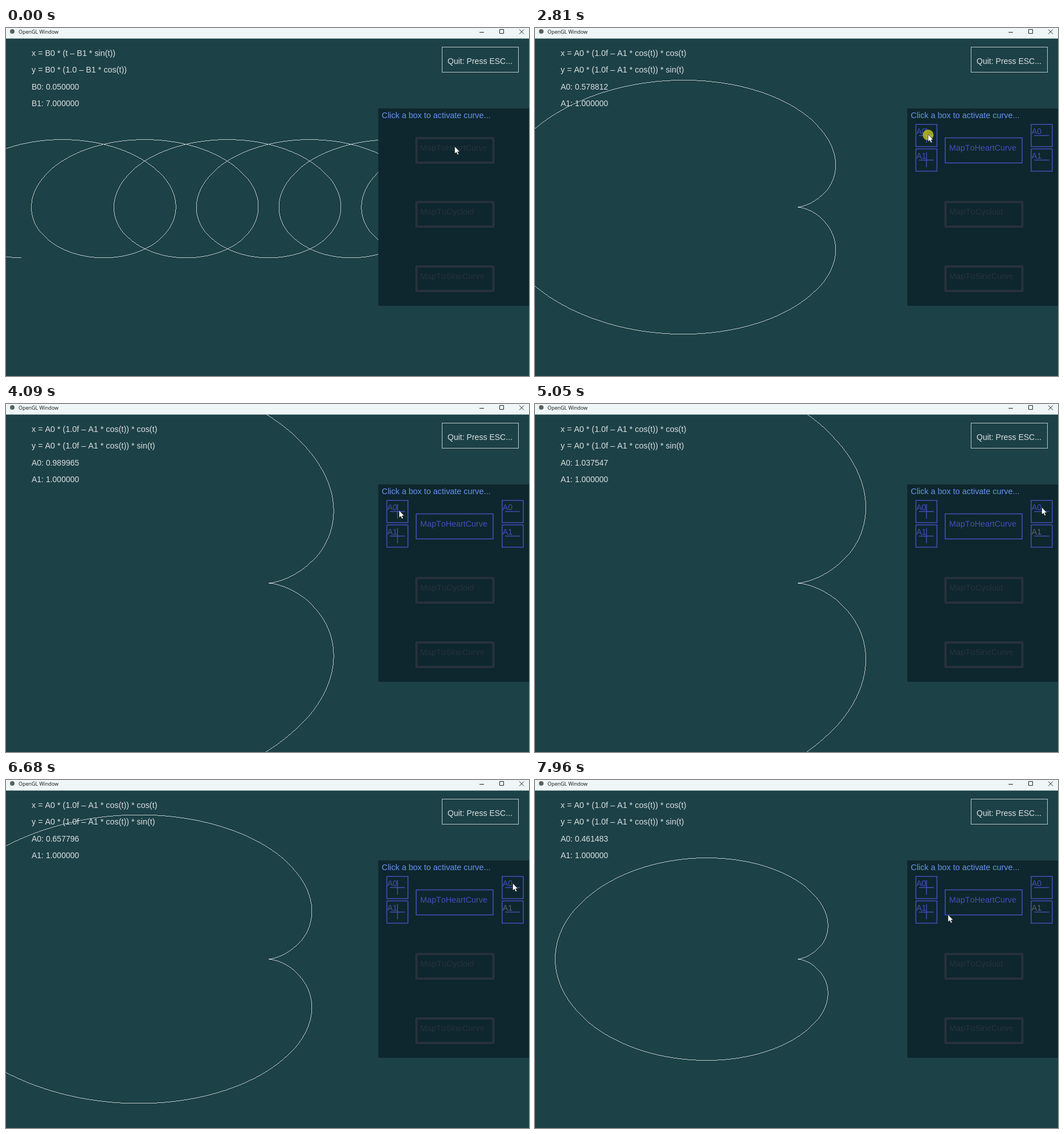
Write an HTML page that moves like this. It is 918 px wide and 610 px high and loops after 8 s.

```html
<!DOCTYPE html>
<html lang="en">
<head>
<meta charset="utf-8">
<title>OpenGL Window</title>
<style>
html, body { margin: 0; width: 100%; height: 100%; overflow: hidden; background: #1c4147; }
svg { display: block; }
text { font-family: "Liberation Sans", Arial, sans-serif; font-kerning: none; white-space: pre; }
.bar { font-family: "Open Sans", "Noto Sans", sans-serif; }
.crisp { shape-rendering: crispEdges; }
</style>
</head>
<body>
<svg id="stage" width="918" height="610" viewBox="0 0 918 610"></svg>
<script>
const LOOP = 8000, HEART_ON = 520;
const LIGHT = '#dcdfdf', LINE = '#bcc6c7', BLUE = '#4150bb', DIM = '#27323c';

// Evenly spaced events: [first time, last time, number of events, ...]
const RAISES = [[2400, 2540, 2], [2810, 3080, 4], [3340, 3820, 7], [4020, 4290, 3]];
const LOWERS = [[4930, 5650, 9], [5730, 5790, 2], [5920, 6410, 7],
                [6610, 6680, 2], [6750, 7360, 12], [7420, 7490, 2]];
// The pointer moves in steps to the x, y that end each entry
const MOVES = [[1120, 1120, 1, 782, 209.5], [1250, 1810, 9, 696, 186.5], [2340, 2340, 1, 690, 186.5],
               [4360, 4650, 5, 908, 184], [4720, 4790, 2, 895, 183], [4860, 4860, 1, 889.5, 181],
               [7690, 7960, 5, 725, 236]];

const label = (x, y, s, size = 14.35, fill = LIGHT, extra = '') =>
  `<text x="${x}" y="${y}" font-size="${size}" fill="${fill}" ${extra}>${s}</text>`;
const box = (x, y, w, h, color, width) =>
  `<rect x="${x}" y="${y}" width="${w}" height="${h}" fill="none" stroke="${color}" stroke-width="${width}" stroke-linejoin="round"/>`;
const line = d => `<path d="${d}" fill="none" stroke="${BLUE}" stroke-width="1.4"/>`;

const stepButton = (x, y, name, plus) =>
  box(x, y, 37, 39, BLUE, 1.6) +
  line(`M${x + 5.5} ${y + 19.5}h26` + (plus ? `M${x + 18.7} ${y + 6}v26` : '')) +
  label(x + 1, y + 16.5, name, 14, BLUE, plus ? '' : `id="minus${name}"`);

const idleButton = (y, name, size) =>
  box(720.5, y, 135, 43, DIM, 4) + label(727, y + 22, name, size, DIM);

document.getElementById('stage').innerHTML = `
  <rect width="918" height="610" fill="#1c4147"/>
  <path id="curve" class="crisp" fill="${LINE}"/>
  ${[48.5, 78, 107.5, 137].map((y, i) => label(45, y, '', i < 2 ? 14.35 : 14, LIGHT, 'class="info"')).join('')}
  <rect x="765.5" y="33.5" width="134" height="44" class="crisp" fill="none" stroke="${LINE}"/>
  ${label(775, 63, 'Quit: Press ESC...', 14.05)}
  <rect x="653.5" y="141" width="265" height="346" fill="#0e262d"/>
  ${label(659.5, 158, 'Click a box to activate curve...', 14.38, '#6495ed')}
  <g id="idle">${idleButton(193, 'MapToHeartCurve', 14.35)}</g>
  <g id="active">
    ${box(720, 192.5, 135, 44, BLUE, 1.6)}${label(727, 215, 'MapToHeartCurve', 14.35, BLUE)}
    ${stepButton(668.5, 169, 'A0', true)}${stepButton(668.5, 212, 'A1', true)}
    ${stepButton(870.8, 169, 'A0', false)}${stepButton(870.8, 212, 'A1', false)}
  </g>
  ${idleButton(305, 'MapToCycloid', 14.8)}
  ${idleButton(418, 'MapToSineCurve', 14.5)}
  <rect width="918" height="18.5" fill="#eff6f8"/>
  <circle cx="11" cy="6" r="4" fill="#5a5f62"/>
  ${label(22, 10, 'OpenGL Window', 8.95, '#111', 'class="bar"')}
  <path d="M831 7.5h8M866.5 2.5h7v7h-7zM901 2.5l8 8m0-8l-8 8" fill="none" stroke="#222"/>
  <g id="pointer">
    <circle id="press" cy="1" r="9.5" fill="#c6c41c" opacity=".8"/>
    <path d="M0 0V12.8L3 10.2 5 14.8 7.2 13.8 5.2 9.4H9Z" fill="#fff" stroke="#111" stroke-width=".6"/>
  </g>`;

const $ = id => document.getElementById(id);
const info = document.querySelectorAll('.info');

function hits(t, [first, last, n]) {
  if (t < first) return 0;
  return n < 2 ? 1 : Math.min(n, 1 + Math.floor((t - first) / (last - first) * (n - 1) + 1e-6));
}
const total = (t, groups) => groups.reduce((sum, g) => sum + hits(t, g), 0);

function pointerAt(t) {
  let x = 787.5, y = 207.5;
  for (const m of MOVES) {
    const p = hits(t, m) / m[2];
    x += (m[3] - x) * p;
    y += (m[4] - y) * p;
  }
  return [x, y];
}

// Single precision, as the displayed values are
function scaled(value, factor, times) {
  const f = Math.fround(factor);
  while (times-- > 0) value = Math.fround(value * f);
  return value;
}

// Traces a curve as single pixels, dropping the corner of every L-shaped step
function plot(fn, from, to) {
  const n = 12000, dots = [];
  for (let i = 0; i <= n; i++) {
    const [u, v] = fn(from + (to - from) * i / n);
    const x = Math.floor(461 + 461 * u), y = Math.floor(314 - 296 * v);
    const [last, before] = [dots.at(-1), dots.at(-2)];
    if (last && last[0] === x && last[1] === y) continue;
    if (before && Math.abs(before[0] - x) === 1 && Math.abs(before[1] - y) === 1) dots.pop();
    dots.push([x, y]);
  }
  return dots.map(([x, y]) => `M${x} ${y}h1v1h-1z`).join('');
}

let shown;
function draw(t) {
  const up = total(t, RAISES), down = total(t, LOWERS), heart = t >= HEART_ON;
  const key = heart + ':' + up + ':' + down;
  if (key !== shown) {
    shown = key;
    const a = scaled(scaled(0.5, 1.05, up), 0.975, down);
    const lines = heart
      ? ['x = A0 * (1.0f – A1 * cos(t)) * cos(t)', 'y = A0 * (1.0f – A1 * cos(t)) * sin(t)',
         'A0: ' + a.toFixed(6), 'A1: 1.000000']
      : ['x = B0 * (t – B1 * sin(t))', 'y = B0 * (1.0 – B1 * cos(t))', 'B0: 0.050000', 'B1: 7.000000'];
    lines.forEach((s, i) => info[i].textContent = s);
    $('curve').setAttribute('d', heart
      ? plot(u => [a * (1 - Math.cos(u)) * Math.cos(u), a * (1 - Math.cos(u)) * Math.sin(u)], 0, 2 * Math.PI)
      : plot(u => [0.05 * (u - 7 * Math.sin(u)), 0.05 * (1 - 7 * Math.cos(u))], -6 * Math.PI, 6 * Math.PI));
    $('idle').style.display = heart ? 'none' : '';
    $('active').style.display = heart ? '' : 'none';
  }
  $('minusA1').setAttribute('fill', t < 4860 ? BLUE : '#5c6270');
  $('pointer').setAttribute('transform', `translate(${pointerAt(t)})`);
  const pressed = (t >= 450 && t < 720) || (up + down) % 2 === 1;
  $('press').style.display = pressed ? '' : 'none';
}

const start = performance.now();
function tick() {
  draw((performance.now() - start) % LOOP);
  requestAnimationFrame(tick);
}
draw(0);
requestAnimationFrame(tick);
</script>
</body>
</html>
```
